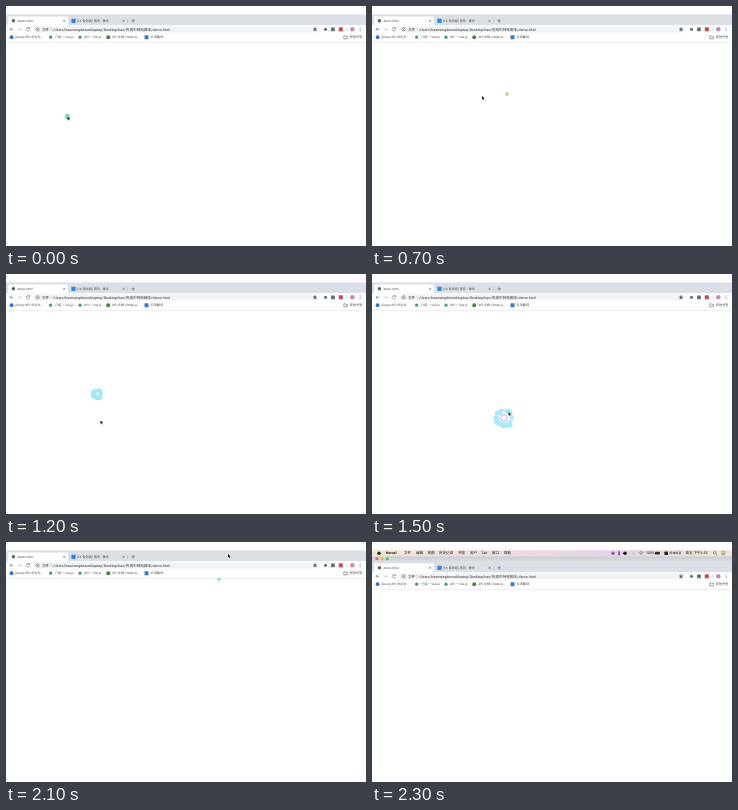
Write an HTML page that moves like this. It is 360 px wide and 240 px high and loops after 2400 ms.

```html
<!DOCTYPE html>
<html lang="en">
<head>
<meta charset="utf-8">
<title>demo.html</title>
<style>
html, body { margin: 0; width: 100%; height: 100%; overflow: hidden; background: #fff; }
svg { display: block; width: 360px; height: 240px; }
text {
  font-family: Roboto, "Noto Sans CJK SC", "Noto Sans CJK", sans-serif;
  font-size: 3.15px; fill: #44474b; white-space: pre; text-rendering: geometricPrecision;
}
.url { font-size: 3.61px; fill: #303236; }
.menu text { font-size: 3.55px; fill: #161417; }
.menu .app { font-weight: 700; }
.line { fill: none; stroke: #62666b; stroke-width: .6; }
.faint { stroke: #b9bcc0; }
.menu { animation: menu 2.4s step-end infinite; }
.window { animation: drop 2.4s step-end infinite; }
@keyframes menu { 0% { visibility: hidden; } 95.8333% { visibility: visible; } }
@keyframes drop { 0% { transform: none; } 95.8333% { transform: translateY(11px); } }
</style>
</head>
<body>
<svg viewBox="0 0 360 240">
  <defs>
    <clipPath id="page"><rect y="36.3" width="360" height="204"/></clipPath>
    <linearGradient id="sky">
      <stop offset="0" stop-color="#f3e6cc"/>
      <stop offset=".25" stop-color="#f0dfdc"/>
      <stop offset=".68" stop-color="#e3d3e8"/>
      <stop offset="1" stop-color="#f3e6cc"/>
    </linearGradient>
    <linearGradient id="title" x2="0" y2="1">
      <stop offset="0" stop-color="#c9cbcf"/>
      <stop offset="1" stop-color="#dbe0e6"/>
    </linearGradient>
  </defs>
  <rect width="360" height="240" fill="#fff"/>

  <g class="menu">
    <rect y="8.2" width="360" height="6" fill="url(#sky)"/>
    <rect y="14.2" width="360" height="6" fill="url(#title)"/>
    <circle cx="5" cy="16.7" r="1.55" fill="#fc5b57"/>
    <circle cx="10.2" cy="16.7" r="1.55" fill="#e9b83a"/>
    <circle cx="15.4" cy="16.7" r="1.55" fill="#35c649"/>
    <circle cx="7" cy="11.2" r="1.7" fill="#222"/>
    <g id="menuText"></g>
    <circle cx="241" cy="11.2" r="1.7" fill="#7b68a8"/>
    <rect x="246.2" y="9.2" width="1.6" height="4" fill="#8b4a72"/>
    <circle cx="253" cy="11.2" r="1.8" fill="#1c1b1d"/>
    <path class="line faint" d="M260 13l3-3.5M260 9.5l3 3.5"/>
    <path class="line" d="M266.6 10.6q2.4-2 4.8 0M267.6 11.8q1.4-1.2 2.8 0M268.7 12.8h.6"/>
    <rect x="283" y="9.8" width="4.8" height="2.6" rx=".5" fill="#333"/>
    <rect x="292.4" y="9.4" width="3.6" height="3.6" rx=".6" fill="#222"/>
    <circle class="line" cx="342.8" cy="10.8" r="1.3"/><path class="line" d="M343.8 11.8l1.4 1.4"/>
    <path class="line" d="M349.4 9.8h4M349.4 11.3h4M349.4 12.8h4"/>
  </g>

  <g class="window">
    <rect y="8.4" width="360" height="11" fill="#dbe0e6"/>
    <path d="M1 19.4q1.2 0 1.2-1.2V12q0-1.4 1.4-1.4H60.6q1.4 0 1.4 1.4v6.2q0 1.2 1.2 1.2z" fill="#fff"/>
    <rect y="19.3" width="360" height="17" fill="#fff"/>
    <rect y="36" width="360" height=".6" fill="#e2e4e7"/>
    <circle cx="7.4" cy="14.8" r="1.7" fill="#5a5e63"/>
    <path class="line" d="M57.2 13.8l2 2m0-2l-2 2M116.6 13.8l2 2m0-2l-2 2M127.2 13v3.6m-1.8-1.8h3.6"/>
    <path class="line faint" d="M121.6 12.6v4.4"/>
    <rect x="65.4" y="12.7" width="4.2" height="4.2" rx=".5" fill="#2f86e6"/>

    <rect x="27.5" y="20.2" width="286" height="6.2" rx="3.1" fill="#f1f3f4"/>
    <path class="line" d="M7.3 23.3H4m1.5-1.5L4 23.3l1.5 1.5"/>
    <path class="line faint" d="M12 23.3h3.3m-1.5-1.5l1.5 1.5-1.5 1.5"/>
    <path class="line" d="M23.4 22.3a1.7 1.7 0 1 0 .2 1.6M23.7 21.2v1.4h-1.4"/>
    <circle class="line" cx="31.6" cy="23.3" r="1.6"/><path class="line" d="M31.6 22.9v1.3"/>
    <path class="line faint" d="M45.2 21.5v3.6M341 21.3v4"/>
    <path d="M309 21.1l.65 1.5 1.6.15-1.2 1.1.35 1.6-1.4-.85-1.4.85.35-1.6-1.2-1.1 1.6-.15z" fill="#5c6064"/>
    <circle cx="319.5" cy="23.3" r="1.6" fill="#68797b"/>
    <rect x="325.1" y="21.5" width="3.7" height="3.7" fill="#587463"/>
    <rect x="332.8" y="21.3" width="4" height="4" fill="#d8424d"/>
    <circle cx="346.3" cy="23.3" r="2.3" fill="#c98bb4"/>
    <path d="M353.7 21.4h.8v.8h-.8zm0 1.5h.8v.8h-.8zm0 1.5h.8v.8h-.8z" fill="#5c6064"/>

    <circle cx="5.6" cy="31.2" r="1.9" fill="#2b70c9"/>
    <circle cx="44.6" cy="31.2" r="1.6" fill="#3b9f78"/>
    <circle cx="74" cy="31.2" r="1.6" fill="#3b9f78"/>
    <circle cx="102.2" cy="31.2" r="2" fill="#47883c"/>
    <rect x="138.5" y="29.2" width="4" height="4" rx=".5" fill="#327de0"/>
    <path class="line" d="M337.8 29.8h1.3l.5.6h1.8v2.4h-3.6z"/>
    <g id="windowText"></g>
  </g>

  <g clip-path="url(#page)"><g id="burst"></g></g>
  <path id="cursor" d="M0 0V3.5L.8 2.75 1.4 4 2 3.75 1.5 2.55H2.6Z" fill="#111" stroke="#fff" stroke-width=".35" paint-order="stroke"/>
</svg>
<script>
const STEP = 100, COUNT = 24;
const $ = id => document.getElementById(id);

function add(parent, tag, attrs, label) {
  const el = document.createElementNS("http://www.w3.org/2000/svg", tag);
  for (const key in attrs) el.setAttribute(key, attrs[key]);
  if (label) el.textContent = label;
  return parent.appendChild(el);
}

function labels(parent, y, items, cls = "") {
  items.forEach(([x, label]) => add(parent, "text", { x, y, class: cls }, label));
}

labels($("windowText"), 15.9, [[11.4, "demo.html"], [71, "(16 条消息) 首页 - 青屿"]]);
labels($("windowText"), 24.5, [
  [36, "文件"], [47, "/Users/haomengdeworklaptop/Desktop/hao/完成中特效脚本/demo.html"]
], "url");
labels($("windowText"), 32.3, [
  [9.6, "jQuery API 中文文…"], [49, "介绍 — Vue.js"], [78, "API — Vue.js"],
  [106.2, "API 文档 | Node.js…"], [144.5, "云禾翻译"], [343.8, "其他书签"]
]);
labels($("menuText"), 12.4, [[14, "Norvel"]], "app");
labels($("menuText"), 12.4, [
  [32, "文件"], [44, "编辑"], [55.5, "视图"], [67, "历史记录"], [86, "书签"], [98, "用户"],
  [109.3, "Tab"], [120, "窗口"], [132, "帮助"], [274, "100%"], [313.5, "周五 下午3:55"]
]);
add($("menuText"), "text", { x: 297.5, y: 12.3, style: "font-size:2.9px" }, "简体拼音");

// Keys are [step, ...values]
const path = [
  [0, 61.5, 110.5], [1, 53, 82], [2, 26, 35], [3, 21, 23], [4, 21, 23], [5, 78, 56],
  [6, 135, 88], [7, 110, 90], [9, 56, 112], [11, 91, 120], [12, 94.5, 146.5],
  [14, 132, 144], [16, 141, 132], [17, 88, 107], [18, 112, 84], [20, 213, 37],
  [21, 222, 12], [23, 236, 9]
];
const ages = [
  [0, .12], [1, .2], [3, .1], [5, .1], [7, .08], [9, .2], [12, .36], [13, .5],
  [17, 1], [18, .3], [21, .06]
];
const tints = [
  [0, 125, 220, 200], [3, 130, 155, 230], [7, 207, 215, 145], [10, 150, 230, 240],
  [12, 160, 232, 253], [17, 172, 234, 247], [21, 130, 224, 214]
];

function at(keys, step) {
  const next = keys.findIndex(key => key[0] > step);
  if (next < 0) return keys[keys.length - 1].slice(1);
  if (next === 0) return keys[0].slice(1);
  const a = keys[next - 1], b = keys[next];
  const mix = (step - a[0]) / (b[0] - a[0]);
  return a.slice(1).map((v, i) => v + (b[i + 1] - v) * mix);
}

let seed = 19;
const random = () => (seed = seed * 16807 % 2147483647) / 2147483647;
const particles = Array.from({ length: 24 }, (_, i) => ({
  angle: (i + random() * 1.4) / 24 * 2 * Math.PI,
  reach: .82 + random() * .26,
  size: .6 + random() * .6,
  dot: add($("burst"), "circle", {})
}));
const ring = add($("burst"), "circle", { fill: "none" });

function draw(step) {
  const [x, y] = at(path, step);
  $("cursor").setAttribute("transform", `translate(${x} ${y})`);
  $("cursor").style.display = step === COUNT - 1 ? "none" : "";

  // The burst trails the pointer by one step
  const [bx, by] = at(path, Math.max(0, step - 1));
  $("burst").setAttribute("transform", `translate(${bx} ${by})`);
  const [age] = at(ages, step);
  const size = .5 + 6 * age * (1 - age) + 1.1 * age;
  $("burst").setAttribute("fill", `rgb(${at(tints, step).map(Math.round)})`);
  for (const p of particles) {
    p.dot.setAttribute("cx", Math.cos(p.angle) * p.reach * 11 * age);
    p.dot.setAttribute("cy", Math.sin(p.angle) * p.reach * 11 * age);
    p.dot.setAttribute("r", size * p.size);
  }
  ring.setAttribute("r", 4.5 * age);
  ring.setAttribute("stroke", age > .7 ? "#b678c4" : "#d5f3ff");
  ring.setAttribute("stroke-width", .2 + .6 * age);
}

function tick() {
  draw(Math.floor(performance.now() / STEP) % COUNT);
  requestAnimationFrame(tick);
}

// Share one clock between the script and the CSS loops
document.getAnimations().forEach(a => { a.startTime = 0; });
tick();
</script>
</body>
</html>
```
